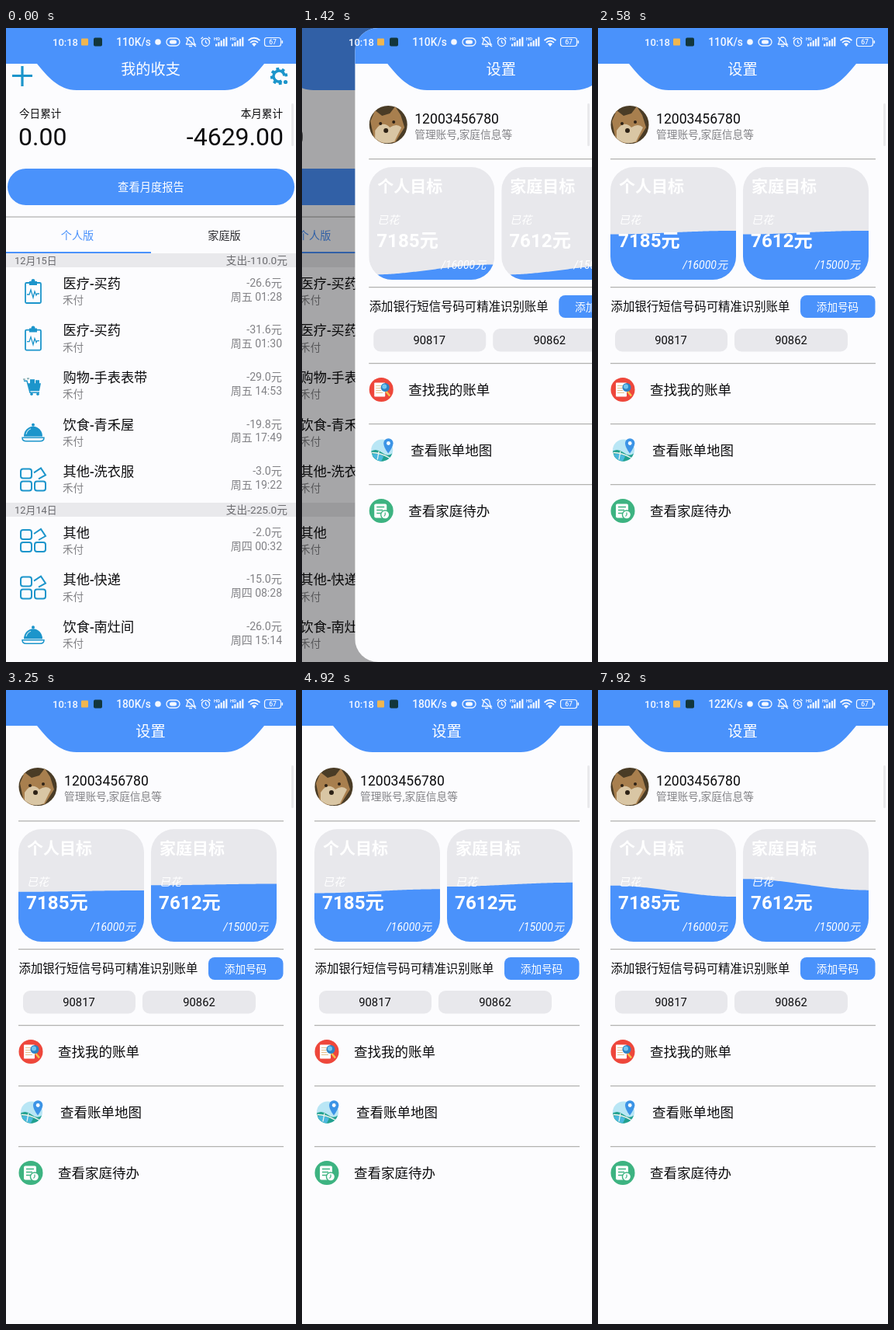
Recreate the animation shown at these times as an HTML page with a canvas. Size 374 by 816 pixels, loop 8 s.

```html
<!DOCTYPE html>
<html lang="zh-CN">
<head>
<meta charset="utf-8">
<style>
html, body { margin: 0; width: 100%; height: 100%; overflow: hidden; background: #fcfcfe; }
canvas { display: block; }
</style>
</head>
<body>
<canvas id="stage" width="374" height="816"></canvas>
<script>
const W = 374, H = 816, LOOP = 8000, FPS = 12;
const BLUE = '#4a92fb', TEAL = '#1c95cb', PAPER = '#fcfcfe', PALE = '#e8e8ec',
      GREY = '#828286', RULE = '#b2b2b0', INK = '#0c0c0e';
const ctx = document.getElementById('stage').getContext('2d');

function text(str, x, y, size, color = INK, align = 'left', style = '400') {
  ctx.font = `${style} ${size}px Roboto, "Noto Sans CJK SC", "Noto Sans CJK", sans-serif`;
  ctx.fillStyle = color;
  ctx.textAlign = align;
  ctx.fillText(str, x, y + size * 0.37);
}
function box(x, y, w, h, r, color) {
  ctx.beginPath();
  ctx.roundRect(x, y, w, h, r);
  ctx.fillStyle = color;
  ctx.fill();
}
function frame(x, y, w, h, r, color, width) {
  ctx.beginPath();
  ctx.roundRect(x, y, w, h, r);
  ctx.strokeStyle = color;
  ctx.lineWidth = width;
  ctx.stroke();
}
function disc(x, y, r, color) {
  ctx.beginPath();
  ctx.arc(x, y, r, 0, 7);
  ctx.fillStyle = color;
  ctx.fill();
}
function fill(d, color) {
  ctx.fillStyle = color;
  ctx.fill(new Path2D(d));
}
function line(d, color, width = 1.5) {
  ctx.strokeStyle = color;
  ctx.lineWidth = width;
  ctx.stroke(new Path2D(d));
}
function at(x, y, draw) {
  ctx.save();
  ctx.translate(x, y);
  draw();
  ctx.restore();
}

// Icons, each centred on 0,0
const icons = {
  medical() {
    frame(-10, -11, 20, 26, 1.5, TEAL, 1.8);
    fill('M-5 -8V-13H-2.5A2.5 3 0 0 1 2.5 -13H5V-8Z', TEAL);
    line('M-8 4H-5L-3 -2L0 8L2 0L4 5L5 3H8', TEAL, 1.3);
  },
  cart() {
    fill('M-7 -3H10L8 7H-4Z', TEAL);
    box(-4, -8, 6, 6, 0, TEAL);
    box(3, -7, 5, 5, 0, TEAL);
    line('M-12 -6H-8L-4 9H8', TEAL, 1.5);
    disc(-2, 11, 1.8, TEAL);
    disc(6, 11, 1.8, TEAL);
    fill('M-13 -9h3v2h-3zM-8 -10h3v2h-3z', '#8fb4bb');
  },
  dish() {
    disc(0, -10, 2, TEAL);
    fill('M-12 5A12 13 0 0 1 12 5Z', TEAL);
    line('M-9 2A9 10 0 0 1 -3 -5', '#bfe3ec', 1.2);
    line('M-14 6.5H14Q14 11 9 11H-9Q-14 11 -14 6.5Z', TEAL, 1.5);
  },
  other() {
    for (const [x, y] of [[-16, -14], [-16, 2], [2, 2]]) frame(x, y, 14, 12, 3, TEAL, 2);
    line('M1 -9L10 -15L16 -6L7 -1', TEAL, 2);
  },
  gear() {
    line('M3.5 6.1A7 7 0 1 1 7 -.5', TEAL, 3.6);
    for (let i = 0; i < 7; i++) {
      ctx.save();
      ctx.rotate((80 + i * 45) * Math.PI / 180);
      box(7.5, -2, 3.6, 4, 0.5, TEAL);
      ctx.restore();
    }
    disc(8.5, 7.5, 2.6, TEAL);
  },
  search() {
    disc(0, 0, 15.5, '#ee473b');
    box(-9, -9, 14, 18, 1, '#fff');
    line('M-7 -5H0M-7 -2H0M-7 1H0M-7 4H2', '#e5c08c', 1);
    line('M6 2L11 8', '#f3c24b', 2.5);
    disc(5, -3, 5.5, '#2d83c4');
    disc(4, -4, 3, '#73c6ef');
  },
  map() {
    disc(0, 0, 14, '#b9e6f5');
    fill('M-14 1Q-7 -3 0 3T13 4A14 14 0 0 1 -12 8Z', '#22a18e');
    fill('M-13 5Q-4 3 2 8L-1 14A14 14 0 0 1 -13 5Z', '#4ab8dd');
    line('M-13 3Q-2 3 10 10M-4 1L-6 12', '#f2f4f0', 1.3);
    fill('M8 4Q2 -4 2 -9A6.2 6.2 0 0 1 14.4 -9Q14 -4 8 4Z', '#3c94e6');
    disc(8.2, -9, 2.4, '#fff');
  },
  todo() {
    const green = '#3db381';
    disc(0, 0, 15.5, green);
    box(-9, -9, 16, 18, 2, '#fff');
    line('M-6 -5H4M-6 -1H2M-6 3H0', green, 1.5);
    disc(5, 5, 6.2, green);
    disc(5, 5, 4.8, '#fff');
    line('M5 2V5L3.5 7', green, 1.2);
  }
};

function header(title) {
  fill('M0 0H374V46H333C320 62 305 80 282 80H91C68 80 53 62 40 46H0Z', BLUE);
  text(title, 186.5, 53, 19.2, '#fff', 'center');
}

const payer = '禾付';
const days = [
  { y: 290, date: '12月15日', sum: '支出-110.0元', rows: [
    ['medical', '医疗-买药', '-26.6元', '周五 01:28'],
    ['medical', '医疗-买药', '-31.6元', '周五 01:30'],
    ['cart', '购物-手表表带', '-29.0元', '周五 14:53'],
    ['dish', '饮食-青禾屋', '-19.8元', '周五 17:49'],
    ['other', '其他-洗衣服', '-3.0元', '周五 19:22']] },
  { y: 611, date: '12月14日', sum: '支出-225.0元', rows: [
    ['other', '其他', '-2.0元', '周四 00:32'],
    ['other', '其他-快递', '-15.0元', '周四 08:28'],
    ['dish', '饮食-南灶间', '-26.0元', '周四 15:14']] }
];

function home() {
  box(0, 0, W, H, 0, PAPER);
  header('我的收支');
  line('M8 61.5H34M21 49V75', TEAL, 3.2);
  at(352, 62, icons.gear);
  text('今日累计', 17, 110, 13.6, INK, 'left', '500');
  text('本月累计', 357, 110, 13.6, INK, 'right', '500');
  text('0.00', 16, 139, 32);
  text('-4629.00', 358, 139, 32, INK, 'right');
  box(2, 181, 370, 47, 23.5, BLUE);
  text('查看月度报告', 187, 205, 14.3, '#fff', 'center', '500');
  box(0, 242.5, W, 1.2, 0, RULE);
  text('个人版', 92, 267, 14.2, BLUE, 'center');
  text('家庭版', 281.5, 267, 14.2, '#2c2c30', 'center', '500');
  box(0, 288, 187, 2, 0, BLUE);
  for (const day of days) {
    box(0, day.y, W, 18, 0, '#e9e9ec');
    text(day.date, 11, day.y + 9, 12.9, '#6c6c70');
    text(day.sum, 363, day.y + 9, 13.7, '#6c6c70', 'right');
    day.rows.forEach(([icon, name, amount, when], i) => {
      const y = day.y + 38.5 + i * 60.6;
      at(35, y + 10.5, icons[icon]);
      text(name, 73.5, y, 17.2, INK, 'left', '500');
      text(payer, 73, y + 21.5, 13.6, GREY);
      text(amount, 356, y - 1, 14.2, GREY, 'right');
      text(when, 356, y + 17, 14, GREY, 'right');
    });
  }
}

// The liquid rises at a steady rate while its surface rocks from side to side
function goalCard(x, title, spent, goal, t) {
  const w = 162, top = 179, h = 145;
  const depth = Math.min(h * spent / goal, Math.max(0, (t - 1100) * 0.041));
  const tilt = 8 * Math.cos((t - 6496) / 686 * 2 * Math.PI);
  ctx.save();
  ctx.beginPath();
  ctx.roundRect(x, top, w, h, 30);
  ctx.clip();
  box(x, top, w, h, 0, PALE);
  ctx.beginPath();
  ctx.moveTo(x, top + h);
  for (let i = 0; i <= w; i += 2)
    ctx.lineTo(x + i, top + h - depth + tilt * Math.sin((i / w - 0.5) * Math.PI));
  ctx.lineTo(x + w, top + h);
  ctx.fillStyle = BLUE;
  ctx.fill();
  ctx.restore();
  text(title, x + 11, 203, 21, '#fff', 'left', '700');
  text('已花', x + 11, 247, 14, '#fff', 'left', 'italic 400');
  text(spent + '元', x + 10, 273, 24.2, '#fff', 'left', '700');
  text(`/${goal}元`, x + 151, 305, 14, '#fff', 'right', 'italic 400');
}

function avatar() {
  ctx.save();
  ctx.beginPath();
  ctx.arc(41, 124.5, 24.5, 0, 7);
  ctx.clip();
  box(16, 100, 50, 50, 0, '#4a3c26');
  fill('M18 120L24 106L33 113L43 110L50 101L57 112L62 128L50 147L24 149Z', '#a87f4e');
  fill('M24 132Q33 118 43 128Q52 122 58 128L49 146Q36 152 24 142Z', '#d9c6a4');
  disc(31, 123, 2, '#2d2216');
  disc(48, 121, 2, '#2d2216');
  disc(38, 132, 3, '#2d2216');
  ctx.restore();
}

function settings(t) {
  box(-2, 0, W + 2, H, 0, PAPER);
  box(-2, 0, 3, 46, 0, BLUE);
  header('设置');
  avatar();
  text('12003456780', 75, 116, 17.6);
  text('管理账号,家庭信息等', 75, 137, 13.7, GREY);
  for (const y of [168, 333, 431, 509, 587]) box(16, y, 342, 1.2, 0, RULE);
  goalCard(16, '个人目标', 7185, 16000, t);
  goalCard(187, '家庭目标', 7612, 15000, t);
  text('添加银行短信号码可精准识别账单', 16.5, 358, 15.4);
  box(261, 344, 96.5, 29, 8, BLUE);
  text('添加号码', 309, 358.5, 13.6, '#fff', 'center');
  box(22, 387, 145, 29.5, 9, PALE);
  box(176, 387, 146, 29.5, 9, PALE);
  text('90817', 94, 402, 14.8, INK, 'center');
  text('90862', 249, 402, 14.8, INK, 'center');
  at(32, 465.5, icons.search);
  text('查找我的账单', 67, 465.5, 17.5);
  at(33, 543.5, icons.map);
  text('查看账单地图', 70, 543.5, 17.5);
  at(32, 621.5, icons.todo);
  text('查看家庭待办', 67, 621.5, 17.5);
}

function statusBar(t) {
  const white = '#f4f8ff';
  text('10:18', 60, 18, 13, white, 'left', '500');
  box(97, 13.5, 9, 9, 1, '#f0b650');
  box(113, 12.5, 11, 11, 2, '#12363c');
  const speed = t < 3000 ? 110 : t < 7000 ? 180 : 122;
  text(speed + 'K/s', 187, 18, 13.8, white, 'right', '500');
  disc(196, 18, 3.8, white);
  frame(207, 13, 17, 10, 5, white, 1.3);
  box(211, 15.5, 9, 5, 2.5, white);
  line('M232 21H244Q242 19 242 16A4 4 0 0 0 234 16Q234 19 232 21M236 23.5H240M232 12L245 24', white, 1.3);
  line('M262.5 18.5A5 5 0 1 1 262.5 18.4M257.5 15.5V18.5L259.5 20M251.5 14L254 11.8M263.5 14L261 11.8', white, 1.3);
  for (const x of [268, 289]) {
    text('HD', x, 13.5, 6, white, 'left', '700');
    for (let i = 0; i < 5; i++) box(x + 2 + i * 3.3, 20.5 - i * 2.2, 2.2, 3 + i * 2.2, 0, white);
  }
  line('M312.5 16Q320 9.5 327.5 16M315 18.8Q320 14.5 325 18.8', white, 1.7);
  fill('M317 20.5Q320 18 323 20.5L320 24Z', white);
  frame(333.5, 12.5, 21, 11, 3, white, 1.2);
  box(355.5, 16, 1.6, 4, 0.8, white);
  text('67', 344, 18, 8.5, white, 'center', '500');
}

function draw(t) {
  // Critically damped slide of the settings page over the home page
  const a = Math.max(0, (t - 1060) / 1000 * 8.63);
  const rest = (1 + a) * Math.exp(-a);
  const offset = W * rest < 1 ? 0 : W * rest;
  if (offset) {
    at(-W / 4 * (1 - rest), 0, home);
    box(0, 0, W, H, 0, `rgba(0, 0, 0, ${0.42 * (1 - rest)})`);
  }
  if (a) at(offset, 0, () => {
    const r = Math.min(30, offset);
    ctx.beginPath();
    ctx.roundRect(offset ? -2 : 0, 0, W + 40, H, [r, 0, 0, r]);
    ctx.clip();
    settings(t);
  });
  box(368, 97, 3, 55, 1.5, '#e9e9ec');
  statusBar(t);
}

function tick() {
  const step = Math.floor((performance.now() % LOOP + 4) * FPS / 1000) % (LOOP * FPS / 1000);
  draw(step * 1000 / FPS);
  requestAnimationFrame(tick);
}
tick();
</script>
</body>
</html>
```
